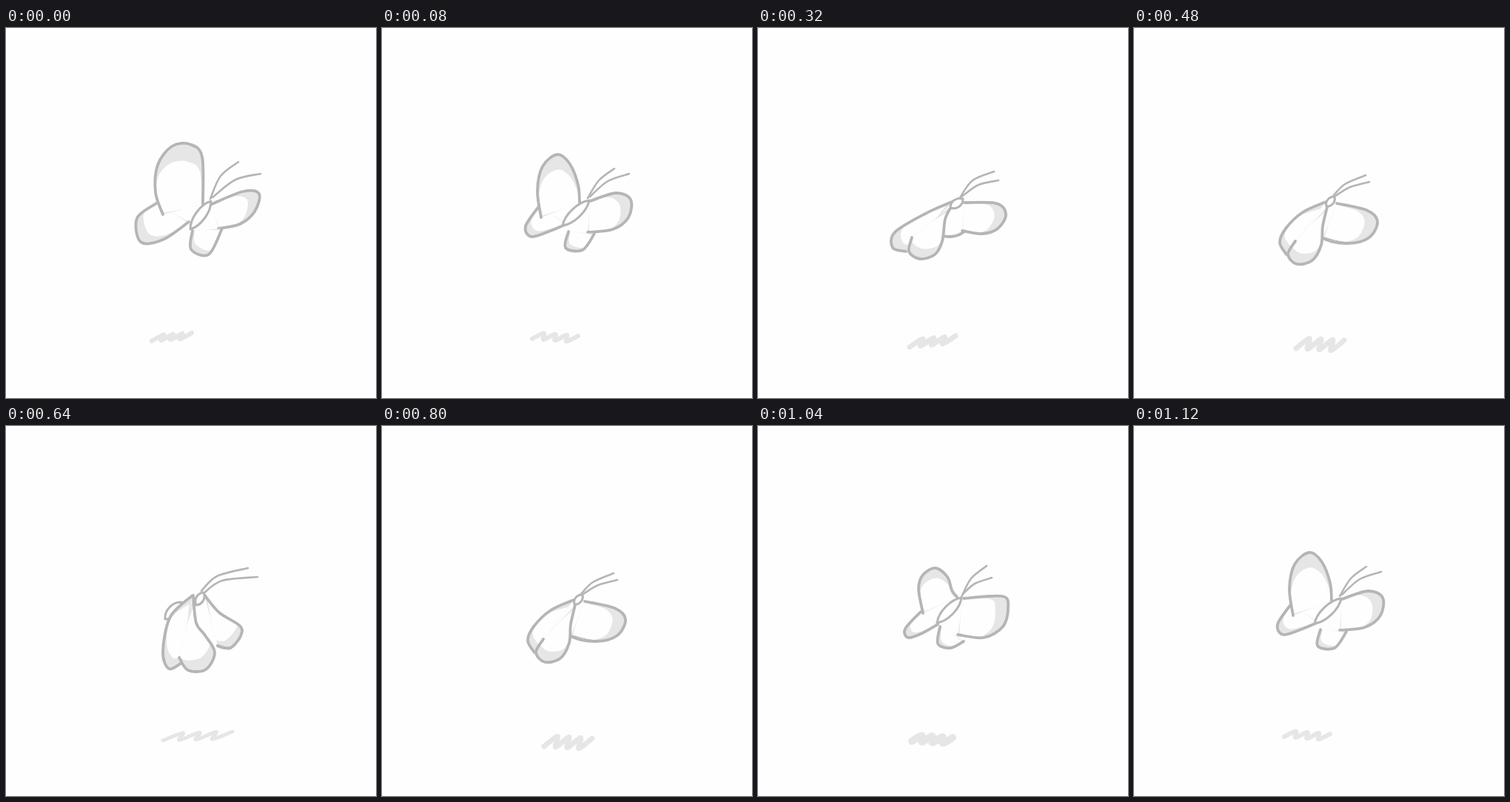
These frames come from a looping animation (500 by 500 pixels, 1200 ms). An HTML page with a canvas:

```html
<!DOCTYPE html>
<html lang="en">
<head>
<meta charset="utf-8">
<title>Butterfly</title>
<style>
html, body { margin: 0; height: 100%; overflow: hidden; background: #fefefe; }
canvas { display: block; }
</style>
</head>
<body>
<canvas id="stage" width="500" height="500"></canvas>
<script>
const ctx = document.getElementById('stage').getContext('2d');
const PAPER = '#fefefe', LINE = '#b5b5b5', SHADE = '#e6e6e6', STEP = 80;

const points = text => text.split(' ').map(p => p.split(',').map(Number));

// Wings run from back to front; ground is start, end, and half size of a tooth.
const pose = (thickness, ground, wings, body, feelers, abdomen) => ({
  thickness, abdomen: abdomen && points(abdomen),
  parts: [ground, ...wings, body, ...feelers].map(points)
});

const raised = pose(6, '202,419 246,416 5,4', [
  '278,238 320,221 342,224 336,248 316,265 287,271',
  '252,274 250,299 274,306 292,271',
  '203,237 177,257 182,289 212,286 247,262',
  '212,252 202,222 205,185 224,160 248,157 265,174 266,238'
], '249,272 277,234', ['276,231 290,200 314,181', '279,229 310,205 344,197']);

const high = pose(6, '207,416 261,420 4,4', [
  '281,234 316,223 336,232 333,256 312,272 278,276',
  '252,275 248,297 271,300 287,278',
  '212,241 194,268 202,282 228,274 249,265',
  '215,256 210,220 217,187 237,171 254,184 265,212 267,236'
], '244,267 280,233', ['278,230 293,206 314,190', '281,228 305,207 334,197']);

const open = pose(10, '211,422 260,425 3,4', [
  '278,233 330,230 338,245 331,271 305,286 270,282',
  '246,271 243,294 260,300 278,291',
  '220,251 199,274 203,286 222,280 243,268',
  '223,253 217,220 223,201 240,192 256,204 262,222 269,231'
], '242,266 275,232', ['275,231 288,206 309,189', '277,227 293,213 316,205']);

const level = pose(7, '210,426 262,421 5,5', [
  '279,236 322,237 335,252 324,271 303,278 276,274',
  '250,281 260,282 270,280 279,275',
  '200,302 182,297 185,276 226,251 264,234',
  '208,283 204,302 219,312 239,306 249,288 253,258 262,240'
], '260,243 277,231', ['273,229 290,206 319,194', '275,228 298,212 325,206']);

const low = pose(7, '224,426 279,429 5,7', [
  '274,237 314,246 329,261 318,283 289,291 255,284',
  '255,284 265,288 275,290 289,291',
  '206,306 197,290 205,271 228,249 259,235',
  '218,288 208,306 220,319 241,314 253,293 255,268 261,242'
], '260,241 271,228', ['269,227 285,211 313,199', '272,227 292,215 318,208']);

const folded = pose(5, '220,420 298,418 8,5', [
  '268,228 288,252 316,270 317,284 303,300 286,297',
  '286,297 291,299 296,300 303,300',
  '236,321 220,328 212,305 222,258 252,229',
  '234,313 246,330 270,329 282,306 269,283 257,266 253,229'
], '257,242 267,225', ['264,223 285,203 327,192', '267,226 292,209 340,204'],
'215,261 237,238');

const mid = (a, b) => (a + b) / 2;
const midPoint = (p, q) => [mid(p[0], q[0]), mid(p[1], q[1])];
const between = (a, b) => ({
  thickness: mid(a.thickness, b.thickness),
  parts: a.parts.map((part, i) => part.map((p, j) => midPoint(p, b.parts[i][j])))
});

const flat = between(open, level);
const sinking = between(level, low);
const closing = between(low, folded);
const cycle = [raised, high, open, flat, level, sinking, low, closing,
  folded, closing, low, sinking, level, open, high];

// Smooth curve through all points (Catmull-Rom as Beziers).
function curve(pts) {
  const path = new Path2D();
  const at = i => pts[Math.max(0, Math.min(pts.length - 1, i))];
  path.moveTo(...pts[0]);
  for (let i = 0; i < pts.length - 1; i++) {
    const [a, b, c, d] = [at(i - 1), at(i), at(i + 1), at(i + 2)];
    path.bezierCurveTo(
      b[0] + (c[0] - a[0]) / 6, b[1] + (c[1] - a[1]) / 6,
      c[0] - (d[0] - b[0]) / 6, c[1] - (d[1] - b[1]) / 6, c[0], c[1]);
  }
  return path;
}

function stroke(path, width, color = LINE) {
  ctx.lineWidth = width;
  ctx.strokeStyle = color;
  ctx.stroke(path);
}

function fill(path, color) {
  ctx.fillStyle = color;
  ctx.fill(path);
}

// A grey wing with a paler copy pulled toward its root leaves a crescent at the tip.
function wing(pts) {
  const path = curve(pts);
  const [x, y] = midPoint(pts[0], pts[pts.length - 1]);
  const far = p => Math.hypot(p[0] - x, p[1] - y);
  const tip = pts.reduce((a, b) => far(b) > far(a) ? b : a);
  const angle = Math.atan2(tip[1] - y, tip[0] - x);
  fill(path, SHADE);
  ctx.save();
  ctx.clip(path);
  ctx.translate(x, y);
  ctx.rotate(angle);
  ctx.scale(0.73, 0.94);
  ctx.rotate(-angle);
  ctx.translate(-x, -y);
  fill(path, PAPER);
  ctx.restore();
  stroke(path, 3.8);
}

function leaf([[x, y], [u, v]]) {
  const path = new Path2D();
  const length = Math.hypot(u - x, v - y);
  const bulge = Math.min(9, length * 0.35) / length;
  const [dx, dy] = [(y - v) * bulge, (u - x) * bulge];
  path.moveTo(x, y);
  for (const [s, a, b] of [[1, u, v], [-1, x, y]]) {
    path.bezierCurveTo(
      mid(x, u) + s * dx - s * (u - x) / 4, mid(y, v) + s * dy - s * (v - y) / 4,
      mid(x, u) + s * dx + s * (u - x) / 4, mid(y, v) + s * dy + s * (v - y) / 4, a, b);
  }
  fill(path, PAPER);
  stroke(path, 3);
}

function scribble([[x, y], [u, v], [dx, dy]], width) {
  const teeth = Array.from({ length: 8 }, (_, i) => {
    const k = i / 7, s = i % 2 ? 1 : -1;
    return [x + (u - x) * k + s * dx, y + (v - y) * k - s * dy];
  });
  stroke(curve(teeth), width, SHADE);
}

function draw({ thickness, abdomen, parts }) {
  const [ground, ...rest] = parts;
  ctx.fillStyle = PAPER;
  ctx.fillRect(0, 0, 500, 500);
  scribble(ground, thickness);
  if (abdomen) leaf(abdomen);
  rest.slice(0, 4).forEach(wing);
  leaf(rest[4]);
  for (const feeler of rest.slice(5)) stroke(curve(feeler), 2.6);
}

ctx.lineCap = ctx.lineJoin = 'round';
const start = performance.now();
function tick() {
  const t = performance.now() - start;
  draw(cycle[Math.floor(t / STEP) % cycle.length]);
  requestAnimationFrame(tick);
}
tick();
</script>
</body>
</html>
```
